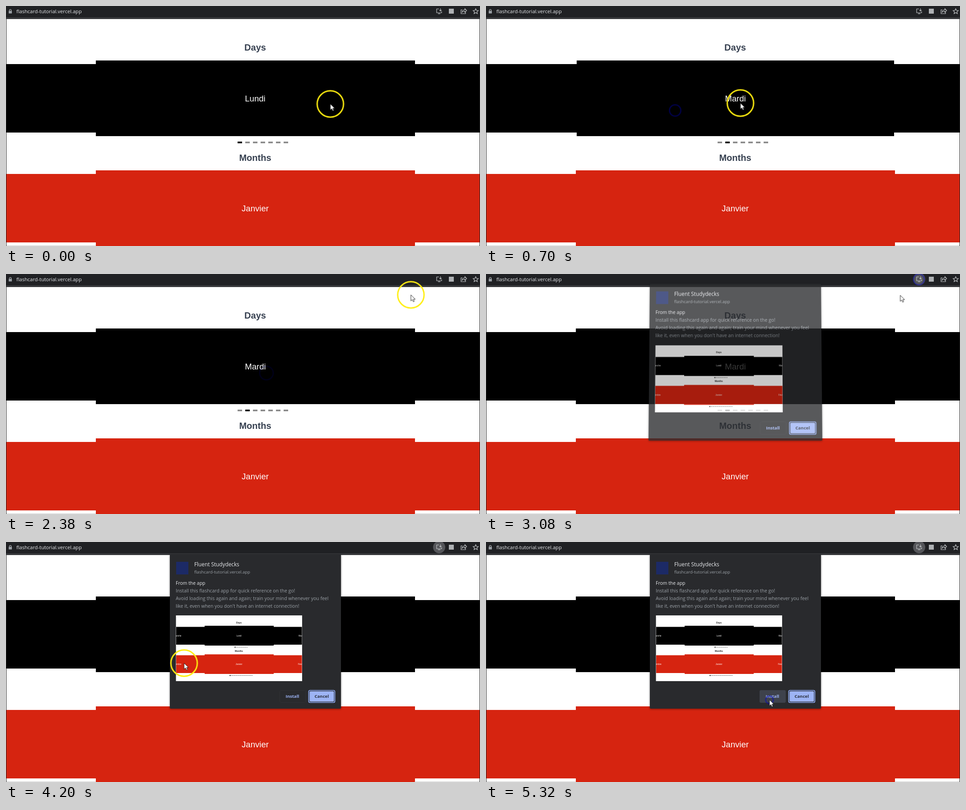
Write an HTML page that moves like this. It is 1050x533 px and loops after 5600 ms.

```html
<!DOCTYPE html>
<html lang="en">
<head>
<meta charset="utf-8">
<title>Flashcards</title>
<style>
  @property --p { syntax: "<number>"; inherits: true; initial-value: 0; }

  html, body { margin: 0; width: 100%; height: 100%; overflow: hidden; background: #fff; }
  body { position: relative; }
  .layer { position: absolute; left: 0; top: 0; width: 1050px; height: 533px; overflow: hidden; }

  .slide, .slide div { position: absolute; }
  .days, .card, .active, .arrow, .halo, .click, .dialog, .hover, .tool {
    animation: 5600ms linear infinite;
  }

  .heading { font: bold 20px "Liberation Sans", Arial, sans-serif; fill: #374151; text-anchor: middle; }

  /* carousels */
  .days { animation-name: swipe; }
  .slide {
    --o: calc(var(--i) - var(--p));
    left: 198.5px; top: 121px; width: 707px; height: 168px;
    transform: translateX(calc(var(--o) * 624px))
      scale(calc(1 - .095 * min(1, max(var(--o), -1 * var(--o)))));
    font: 18.6px/169px "Liberation Sans", Arial, sans-serif;
    color: #fff; text-align: center;
  }
  .months .slide { top: 365px; }
  .slide div { inset: 0; background: #000; }
  .months .slide div { background: #d62410; }
  .slide .card { background: none; transform-style: preserve-3d; animation-name: flip; }
  .card div { backface-visibility: hidden; }
  .card .back { transform: rotateY(180deg); }

  @keyframes swipe {
    0%, 2.5% { --p: 0; }
    7.5% { --p: .48; animation-timing-function: cubic-bezier(.2, .6, .3, 1); }
    12.5%, 100% { --p: 1; }
  }
  @keyframes flip {
    0%, 7.5% { transform: rotateY(20deg); }
    12.5% { transform: rotateY(6deg); }
    14%, 20% { transform: rotateY(0deg); animation-timing-function: ease-in-out; }
    28%, 33.2% { transform: rotateY(180deg); animation-timing-function: ease-in-out; }
    41%, 100% { transform: rotateY(360deg); }
  }

  /* pager */
  .dash { stroke: #858585; stroke-width: 3.5; stroke-dasharray: 10 7; }
  .active { stroke: #000; stroke-width: 3.5; animation-name: page; animation-timing-function: step-end; }
  @keyframes page { 0% { transform: none; } 7.5%, 100% { transform: translateX(17px); } }

  /* toolbar and dialog */
  .ui { font-family: "Open Sans", "Noto Sans", sans-serif; }
  .icon { fill: none; stroke: #c4c7c9; stroke-width: 1.2; }
  .tool { fill: #55565a; opacity: 0; animation-name: tool; animation-timing-function: step-end; }
  .dialog { transform-origin: 552.5px 370px; animation-name: open; }
  .dialog .body { font-size: 10.45px; fill: #9aa0a6; }
  .dialog .button { font-size: 9.6px; font-weight: 700; text-anchor: middle; }
  .panel { fill: #292a2d; filter: drop-shadow(0 1px 2px #0007); }
  .hover { fill: #3e424c; opacity: 0; animation-name: hover; }
  .mini { font: 4.6px "Liberation Sans", Arial, sans-serif; fill: #fff; text-anchor: middle; }
  .mini .title { font-weight: bold; font-size: 5px; fill: #222; }
  .mini line { stroke: #555; stroke-width: 1; stroke-dasharray: 3 1.4; }

  @keyframes tool { 0% { opacity: 0; } 50%, 100% { opacity: 1; } }
  @keyframes hover { 0%, 88% { opacity: 0; } 90%, 100% { opacity: 1; } }
  @keyframes open {
    0%, 52.5% { opacity: 0; transform: perspective(1000px) rotateX(5deg) scale(1.05, 1.08); }
    55% { opacity: .78; transform: perspective(1000px) rotateX(2.56deg) scale(1.0158, 1.033); }
    57.5%, 100% { opacity: 1; transform: perspective(1000px) rotateX(0deg) scale(1, 1); }
  }

  /* pointer */
  .arrow { animation-name: move; }
  .halo { fill: none; stroke: #ffee10; stroke-width: 3; animation-name: halo; animation-timing-function: step-end; }
  .click { fill: none; stroke: #0000c8; stroke-width: 3; animation-name: click; }

  @keyframes move {
    0% { transform: translate(718.5px, 217.5px); }
    2.5% { transform: translate(716px, 218px); }
    5% { transform: translate(600px, 226px); }
    7.5% { transform: translate(419px, 232px); }
    10% { transform: translate(470px, 226px); }
    12.5% { transform: translate(563.5px, 215.5px); }
    15%, 35% { transform: translate(577px, 220px); }
    40% { transform: translate(780px, 110px); }
    42.5% { transform: translate(896.5px, 46.5px); }
    45% { transform: translate(945px, 18px); }
    47.5%, 51% { transform: translate(959px, 12px); }
    55% { transform: translate(918px, 47px); }
    62% { transform: translate(760px, 130px); }
    74%, 76% { transform: translate(394.5px, 269px); }
    84% { transform: translate(520px, 320px); }
    90%, 100% { transform: translate(628px, 350.5px); }
  }
  @keyframes halo {
    0%, 10%, 22%, 36%, 58% { opacity: 1; }
    2.5%, 17.5%, 32%, 47.5%, 92%, 100% { opacity: 0; }
  }
  @keyframes click {
    0%, 2.4% { transform: translate(716px, 218px); r: 9px; opacity: 0; }
    2.5% { transform: translate(716px, 218px); opacity: 1; }
    5% { transform: translate(600px, 226px); }
    7.5% { transform: translate(419px, 232px); r: 9px; opacity: 1; }
    12.5% { r: 12.5px; opacity: .33; }
    17.4% { transform: translate(419px, 232px); r: 16px; opacity: 0; }
    17.5%, 20% { transform: translate(577px, 220px); r: 9px; opacity: 1; }
    25% { r: 12.5px; opacity: .33; }
    30% { r: 16px; opacity: 0; }
    31.9% { r: 9px; opacity: 0; }
    32%, 33.2% { r: 9px; opacity: 1; }
    38% { r: 12.5px; opacity: .33; }
    42.5% { r: 15px; opacity: .12; }
    45% { transform: translate(577px, 220px); r: 16px; opacity: 0; }
    47.4% { transform: translate(959px, 12px); r: 9px; opacity: 0; }
    47.5%, 50.7% { transform: translate(959px, 12px); r: 9px; opacity: 1; }
    55% { r: 12px; opacity: .4; }
    63% { transform: translate(959px, 12px); r: 16px; opacity: 0; }
    91.9% { transform: translate(628px, 350.5px); r: 8.5px; opacity: 0; }
    92%, 100% { transform: translate(628px, 350.5px); r: 8.5px; opacity: .45; }
  }
</style>
</head>
<body>

<div class="layer days">
  <div class="slide" style="--i:-1"><div>Dimanche</div></div>
  <div class="slide" style="--i:2"><div>Mercredi</div></div>
  <div class="slide" style="--i:0"><div>Lundi</div></div>
  <div class="slide" style="--i:1">
    <div class="card"><div>Mardi</div><div class="back">Tuesday</div></div>
  </div>
</div>

<div class="layer months">
  <div class="slide" style="--i:-1"><div>Décembre</div></div>
  <div class="slide" style="--i:1"><div>Février</div></div>
  <div class="slide" style="--i:0"><div>Janvier</div></div>
</div>

<svg class="layer ui" viewBox="0 0 1050 533">
  <g class="heading">
    <text x="552" y="99">Days</text>
    <text x="552" y="344">Months</text>
  </g>
  <path class="dash" d="M513 303H625"/>
  <path class="active" d="M513 303h10"/>
  <path d="M0 532.5H198.5M905.5 532.5H1050" stroke="#ccc"/>
  <path d="M.5 0V533M1049.5 0V533" stroke="#222"/>

  <path d="M0 0H1050V26H0Z" fill="#202124"/>
  <path d="M0 25H1050V29H0Z" fill="#37383b"/>
  <path d="M6 11h7v5.500h-7z" fill="#9aa0a6"/>
  <path d="M7.500 11V9.500a2 2 0 0 1 4 0V11" class="icon" stroke-width="1"/>
  <text x="23" y="15.500" font-size="11.1" fill="#e8eaed">flashcard-tutorial.vercel.app</text>

  <circle class="tool" cx="959.5" cy="11.500" r="13.500"/>
  <g class="icon">
    <path d="M959 6.500H954V15H965V12M957 17.200H962M962.500 5.500V11M960 8.800l2.500 2.500 2.500-2.500"/>
    <path d="M1011 8.500H1008V17H1018V14M1010.500 13.500c.5-3.500 3-5 6-5V6l4 4-4 4v-2.500c-3 0-4.500.5-6 2z"/>
    <path d="M1040.500 6l1.700 3.800 4.100.4-3.100 2.700.9 4.100-3.600-2.200-3.600 2.200.9-4.100-3.100-2.700 4.100-.4z"/>
  </g>
  <rect x="981" y="6" width="11" height="11" fill="#aeb1b4"/>
</svg>

<svg class="layer ui dialog" viewBox="0 0 1050 533">
  <rect class="panel" x="363" y="27" width="379" height="343" rx="2"/>
  <rect x="377" y="44" width="27" height="28" fill="#1c2a66"/>
  <text x="417" y="54" font-size="11.8" fill="#e8eaed">Fluent Studydecks</text>
  <text x="417" y="70" font-size="9.5" fill="#9aa0a6">flashcard-tutorial.vercel.app</text>
  <g class="body">
    <text x="376" y="94.500" fill="#e8eaed">From the app</text>
    <text x="376" y="111.500">Install this flashcard app for quick reference on the go!</text>
    <text x="376" y="128.500">Avoid loading this again and again; train your mind whenever you feel</text>
    <text x="376" y="145.500">like it, even when you don't have an internet connection!</text>
  </g>

  <svg class="mini" x="376.5" y="163" width="279.5" height="146" viewBox="376.5 163 279.5 146">
    <path d="M376 163H657V309H376Z" fill="#fff"/>
    <path d="M377 188.500H440V186H593V188.500H655.500V228H593V230H440V228H377Z" fill="#000"/>
    <path d="M377 251.500H440V249.500H593V251.500H655.500V291H593V293H440V291H377Z" fill="#d62410"/>
    <text class="title" x="516" y="180.500">Days</text>
    <text class="title" x="516" y="243.500">Months</text>
    <text x="516" y="209.500">Lundi</text>
    <text x="516" y="273">Janvier</text>
    <text x="378" y="209.500">Dimanche</text>
    <text x="654" y="209.500">Mardi</text>
    <text x="378" y="273">Décembre</text>
    <text x="654" y="273">Février</text>
    <line x1="506" x2="535" y1="233.500" y2="233.500"/>
    <line x1="495" x2="546" y1="296.500" y2="296.500"/>
    <path d="M506 233.500h3M495 296.500h3" stroke="#000" stroke-width="1.300"/>
  </svg>

  <rect x="606.5" y="329.500" width="57" height="27" rx="3" fill="none" stroke="#303135"/>
  <rect class="hover" x="606" y="329" width="58" height="28" rx="3"/>
  <rect x="670.5" y="329.500" width="58" height="27" rx="3" fill="none" stroke="#8fabf5" stroke-width="1.700"/>
  <rect x="672.500" y="331.500" width="54" height="23" rx="2" fill="#9db4f5"/>
  <g class="button">
    <text x="634.500" y="346.300" fill="#9db4f5">Install</text>
    <text x="699.300" y="346.300" fill="#2b2f3c">Cancel</text>
  </g>
</svg>

<svg class="layer" viewBox="0 0 1050 533">
  <circle class="click" r="9"/>
  <g class="arrow">
    <circle class="halo" r="29.200"/>
    <path d="M0 0V13.500L3.200 10.600 5.300 15.400 7.600 14.400 5.600 9.800H9.800Z" fill="#fff" stroke="#111" stroke-width=".9"/>
  </g>
</svg>

</body>
</html>
```
